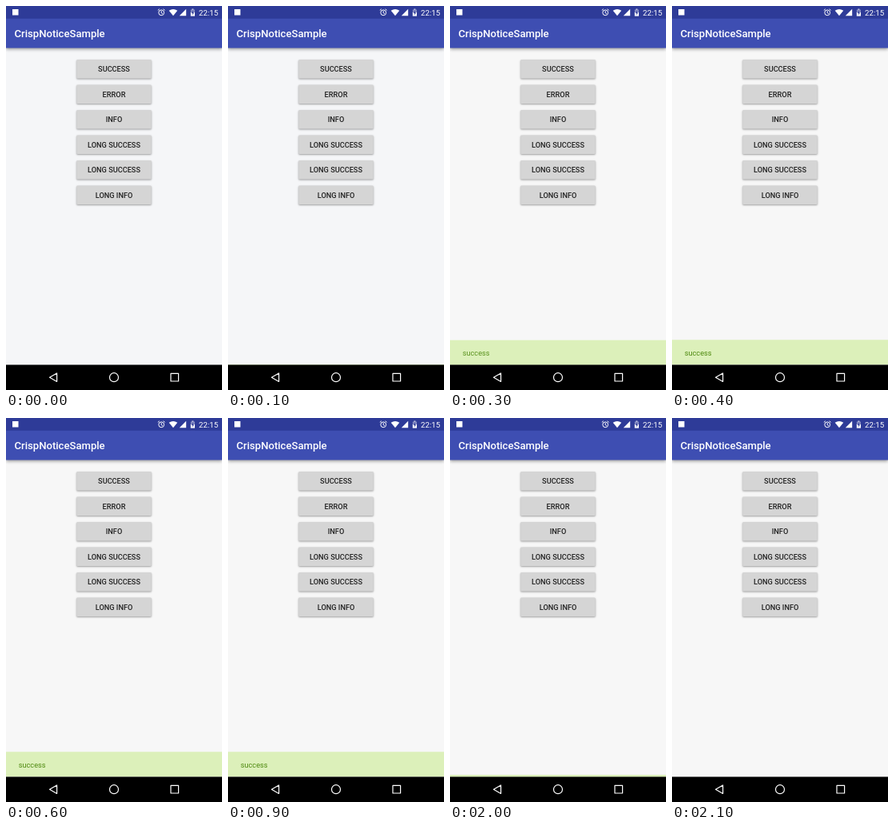
Animation of 270x480 px, one loop 2200 ms. Source, as an HTML page with a canvas:

```html
<!DOCTYPE html>
<html lang="en">
<head>
<meta charset="utf-8">
<style>
  html, body { margin: 0; width: 100%; height: 100%; overflow: hidden; background: #000; }
  canvas { display: block; width: 270px; height: 480px; }
</style>
</head>
<body>
<canvas id="stage"></canvas>
<script>
const W = 270, H = 480, LOOP = 2200, STEP = 100;
const NAV_TOP = 448.5, BAR_HEIGHT = 31.2, SLIDE = 250, FADE = 180;
const ENTER = 85, LEAVE = 1833;
const LABELS = ['SUCCESS', 'ERROR', 'INFO', 'LONG SUCCESS', 'LONG SUCCESS', 'LONG INFO'];

const canvas = document.getElementById('stage');
const ctx = canvas.getContext('2d');
const ratio = window.devicePixelRatio || 1;
canvas.width = W * ratio;
canvas.height = H * ratio;
ctx.scale(ratio, ratio);

const clamp = v => Math.min(1, Math.max(0, v));
const smooth = v => (1 - Math.cos(Math.PI * clamp(v))) / 2;

// Cubic bezier (0.4, 0, 0.2, 1), solved by bisection.
function fastOutSlowIn(x) {
  x = clamp(x);
  if (x === 0 || x === 1) return x;
  let lo = 0, hi = 1, s = 0.5;
  for (let i = 0; i < 24; i++) {
    s = (lo + hi) / 2;
    const bx = 1.2 * (1 - s) ** 2 * s + 0.6 * (1 - s) * s * s + s ** 3;
    if (bx < x) lo = s; else hi = s;
  }
  return 3 * s * s - 2 * s ** 3;
}

function rect(x, y, w, h, color) {
  ctx.fillStyle = color;
  ctx.fillRect(x, y, w, h);
}

function text(str, x, y, size, weight, color, align = 'left') {
  ctx.font = `${weight} ${size}px Roboto, sans-serif`;
  ctx.textAlign = align;
  ctx.fillStyle = color;
  ctx.fillText(str, x, y);
}

function path(points, close) {
  ctx.beginPath();
  points.forEach(([x, y], i) => i ? ctx.lineTo(x, y) : ctx.moveTo(x, y));
  if (close) ctx.closePath();
}

function circle(x, y, r) {
  ctx.beginPath();
  ctx.arc(x, y, r, 0, Math.PI * 2);
}

function shadowed(blur, offset, alpha, draw) {
  ctx.save();
  ctx.shadowColor = `rgba(0,0,0,${alpha})`;
  ctx.shadowBlur = blur * ratio;
  ctx.shadowOffsetY = offset * ratio;
  draw();
  ctx.restore();
}

function drawStatusIcons() {
  ctx.fillStyle = ctx.strokeStyle = '#fff';
  ctx.lineWidth = 1;
  ctx.fillRect(8, 4, 7.5, 7.5);

  // Alarm clock
  circle(194.2, 8.3, 3.4);
  ctx.stroke();
  path([[194.2, 6.2], [194.2, 8.6], [195.8, 9.6]]);
  ctx.stroke();
  path([[189.8, 5.4], [191.8, 3.7]]);
  ctx.stroke();
  path([[198.6, 5.4], [196.6, 3.7]]);
  ctx.stroke();

  // Wi-Fi
  ctx.beginPath();
  ctx.moveTo(209, 12.3);
  ctx.lineTo(203.7, 5.8);
  ctx.quadraticCurveTo(209, 2.2, 214.3, 5.8);
  ctx.fill();

  // Signal
  path([[216.8, 12.2], [225.2, 12.2], [225.2, 3.8]], true);
  ctx.fill();

  // Battery with charging bolt
  ctx.fillStyle = 'rgba(255,255,255,.4)';
  ctx.fillRect(230.8, 4.6, 5.2, 3.4);
  ctx.fillStyle = '#fff';
  ctx.fillRect(232.4, 3.6, 2, 1);
  ctx.fillRect(230.8, 8, 5.2, 4.6);
  ctx.fillStyle = '#303d99';
  path([[233.8, 5.6], [231.8, 9], [233.2, 9], [233.2, 11.6], [235.1, 8.2], [233.8, 8.2]], true);
  ctx.fill();

  text('22:15', 265.2, 11.5, 9.7, 400, '#fff', 'right');
}

function drawHeader() {
  shadowed(4, 1.6, 0.4, () => rect(0, 0, W, 52.5, '#3e4eb2'));
  rect(0, 0, W, 15.75, '#2e3b98');
  drawStatusIcons();
  text('CrispNoticeSample', 10.5, 39, 13.1, 500, '#fff');
}

function drawButton(label, i) {
  const y = 67 + i * 31.5;
  shadowed(2.2, 0.9, 0.36, () => {
    ctx.fillStyle = '#d5d5d5';
    ctx.beginPath();
    ctx.roundRect(88.2, y, 93.6, 23.6, 1.3);
    ctx.fill();
  });
  text(label, 135, y + 15.2, 9.2, 500, '#202020', 'center');
}

function drawNotice(t) {
  const shown = fastOutSlowIn((t - ENTER) / SLIDE) - fastOutSlowIn((t - LEAVE) / SLIDE);
  if (shown <= 0) return;
  const top = NAV_TOP - BAR_HEIGHT * shown;
  rect(0, top, W, BAR_HEIGHT, '#dcf0ba');
  ctx.globalAlpha = smooth((t - ENTER - 70) / FADE) - smooth((t - LEAVE) / FADE);
  text('success', 15.75, top + 19.4, 9.2, 400, '#4f8a10');
  ctx.globalAlpha = 1;
}

function drawNavigation() {
  rect(0, NAV_TOP, W, H - NAV_TOP, '#000');
  ctx.strokeStyle = '#fff';
  ctx.lineWidth = 1.2;
  ctx.lineJoin = 'round';
  path([[54.5, 464.2], [63.6, 459], [63.6, 469.4]], true);
  ctx.stroke();
  circle(135, 464.2, 5.5);
  ctx.stroke();
  ctx.strokeRect(206, 459.4, 9.6, 9.6);
}

function draw(t) {
  rect(0, 0, W, H, t < 300 ? '#f5f6f8' : '#f7f7f7');
  drawHeader();
  LABELS.forEach(drawButton);
  drawNotice(t);
  drawNavigation();
}

const start = performance.now();
function tick() {
  const t = (performance.now() - start) % LOOP;
  draw(Math.floor(t / STEP) * STEP);
  requestAnimationFrame(tick);
}
tick();
</script>
</body>
</html>
```
